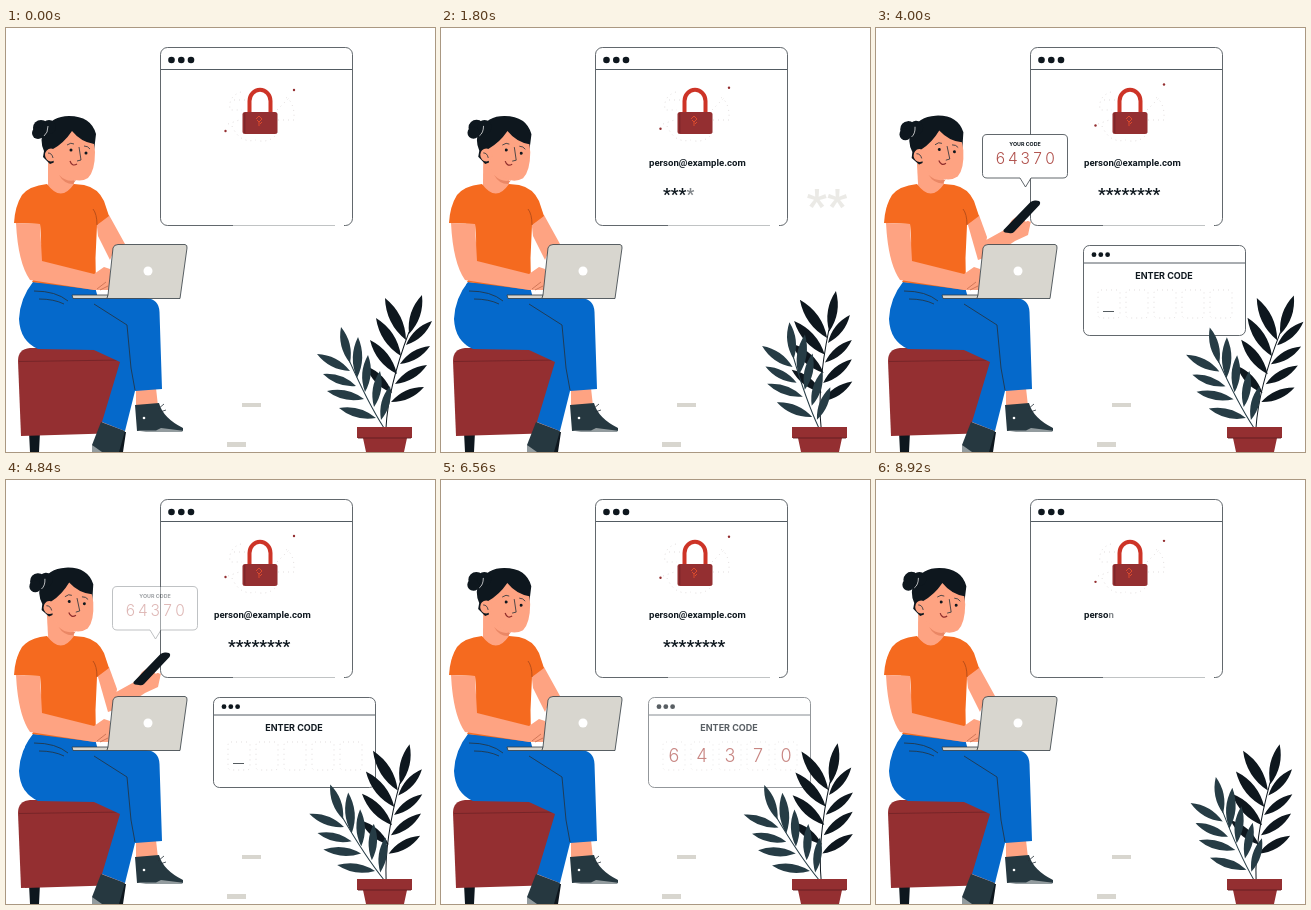
Animation, 429 px wide and 424 px high, one loop 8960 ms. Source, as an HTML page:

```html
<!DOCTYPE html>
<html lang="en">
<head>
<meta charset="utf-8">
<title>Two-step sign in</title>
<style>
  html, body { margin: 0; height: 100%; overflow: hidden; background: #fff; }
  svg { display: block; width: 100vw; height: 100vh; }
  text { fill: #101920; font-family: Inter, sans-serif; }
  .ink { fill: #0e171e; }
  .slate { fill: #263840; }
  .brick { fill: #942f31; }
  .skin { fill: #fea382; }
  .orange { fill: #f56a1f; }
  .blue { fill: #0569cb; }
  .grey { fill: #d8d6cf; }
  .line { fill: none; stroke: #26323a; stroke-width: .8; }
  .card { fill: #fff; stroke: #3a4248; stroke-width: .8; }
  .faint { fill: none; stroke: #d5cfcf; stroke-width: .7; stroke-dasharray: 1 4; }
  .bold { font-weight: 700; text-anchor: middle; }
  .digit { fill: #b0504b; font-weight: 300; text-anchor: middle; }
  .typed { font-family: Roboto, sans-serif; font-weight: 700; }
</style>
</head>
<body>
<svg viewBox="0 0 429 424" preserveAspectRatio="none">
  <!-- sign-in window -->
  <rect class="card" x="154.5" y="19.5" width="192" height="178" rx="7"/>
  <path d="M227 197.5H338" stroke="#fff" stroke-width="1.6"/>
  <path d="M227 197.5H329" stroke="#a5a9ab" stroke-width=".7"/>
  <path class="line" d="M155 41.5H346"/>
  <g class="ink"><circle cx="165.5" cy="32" r="3.3"/><circle cx="175.3" cy="32" r="3.3"/><circle cx="185" cy="32" r="3.3"/></g>

  <g class="faint">
    <path d="M235 64Q222 68 224 82H236M226 98Q234 116 250 112M272 92H288Q289 72 277 68M272 104Q266 114 254 113"/>
    <path d="M271 82L283 70M228 72H240M222 96L236 91"/>
  </g>
  <g id="sparks" class="brick"><circle cx="288" cy="0" r="1.2"/><circle cx="219.5" cy="41" r="1.2"/></g>
  <path id="shackle" d="M243.5 86V73a10.5 11.2 0 0 1 21 0V84" fill="none" stroke="#cd3427" stroke-width="4"/>
  <rect class="brick" x="236.5" y="84" width="35" height="22" rx="2.5"/>
  <path d="M238.8 85V105" stroke="#6f2226" stroke-width=".8"/>
  <path d="M250 91l3-3 3 3-3 3-2-2M253 94v4M256 94l-2 2" fill="none" stroke="#dc4b2d"/>
  <text id="mail" class="typed" x="208" y="137.5" font-size="9.6"></text>
  <text id="pass" class="typed" x="222" y="172" font-size="17.2"></text>
  <text id="stars" class="typed" x="365.5" y="193" font-size="45" style="fill:#d8d6cf">**</text>

  <!-- code window -->
  <g id="codeWin">
    <rect class="card" x="207.5" y="217.5" width="162" height="90" rx="6"/>
    <path class="line" d="M208 235H369"/>
    <g class="ink"><circle cx="218" cy="226.7" r="2.4"/><circle cx="224.8" cy="226.7" r="2.4"/><circle cx="231.6" cy="226.7" r="2.4"/></g>
    <text class="bold" x="288" y="251" font-size="9">ENTER CODE</text>
    <g id="cells"></g>
    <path id="caret" d="M227 283.5H238" stroke="#555c60"/>
  </g>

  <path class="grey" d="M236 375h19v4h-19zM221 414h19v5h-19z"/>

  <!-- seat -->
  <path class="ink" d="M23 404H34L33 424H24zM108 404H120L117 424H110z"/>
  <path class="brick" d="M12 333Q12 321 24 320H104Q116 321 116 334V405L15 408z"/>
  <path d="M13 333.5L116 332" fill="none" stroke="#6f2226" stroke-width=".8"/>

  <!-- legs -->
  <path class="skin" d="M130 361L150 360 152 378H130zM97 393L119 401 115 408 94 399z"/>
  <path class="slate" d="M129 377L153 375Q157 390 177 400V403H131z"/>
  <path d="M131 402.5H150L155 400 177 402.7 176 404H140z" fill="#939c9f"/>
  <path d="M152 381l6-5M154 384l6-2" class="line"/>
  <circle cx="138" cy="390" r="1.3" fill="#fff"/>
  <path class="slate" d="M95 394L119 403 113 424H86V417z"/>
  <path d="M86 417L96 424H86z" fill="#939c9f"/>
  <path class="blue" d="M27 254Q14 270 13 291 14 313 32 321L88 322 114 334 96 394 119 403 129 363 156 361 153.5 284Q153 271 140 270L92 270 89 259z"/>
  <path class="line" d="M28 263Q50 263 62 273M33 271Q48 271 58 276M88 276L121 297 125 340 129 362"/>

  <!-- far arm and phone -->
  <g id="restArm" class="skin"><path d="M90 190L103 187 119 216 109 220 104 232 92 208z"/></g>
  <g id="phoneArm">
    <path class="skin" d="M90 190L103 187 111 209 108 230 102 232z"/>
    <g id="forearm">
      <path class="skin" d="M103 216L130 201 136 192 143 187 152 196 155 193 152 207 139 213 109 233z"/>
      <path class="ink" d="M127.500 202L154.500 174Q157 172 160 172.500L163 173Q165 174 163.500 177L138 204Q136 206 133 205L129 204.500Q127 204 127.500 202z"/>
      <path class="skin" d="M140 203L151 193Q156 192 153 199L147 207 140 209z"/>
    </g>
  </g>

  <!-- torso and near arm -->
  <g id="head">
    <path class="skin" d="M42 130V160Q55 173 68 160V148z"/>
    <path d="M53 147Q61 155 70 152L67 156Q58 156 53 147z" fill="#ea8765"/>
    <path class="ink" d="M38 123Q33 112 38 102 46 88 63 88 85 88 90 106L88 123 78 118 52 133 44 136 37 129z"/>
    <circle class="ink" cx="35" cy="100" r="8"/><circle class="ink" cx="32" cy="105" r="6"/><circle class="ink" cx="43" cy="99" r="7"/>
    <path d="M38 108Q42 105 42 98" stroke="#fff" stroke-width=".7" fill="none"/>
    <path class="skin" d="M47 121Q58 115 66 103 75 114 88 116L89 124Q89 143 82 150 74 155 63 150L48 140z"/>
    <ellipse class="skin" cx="45" cy="127" rx="6" ry="6.500"/>
    <path d="M42 125Q46 125 47 130" class="line"/>
    <circle class="ink" cx="65" cy="122" r="1.500"/><circle class="ink" cx="80" cy="125" r="1.500"/>
    <path class="line" d="M61 117Q65 114 68 116M78 118Q82 118 84 121M73 119L75 132 71 133"/>
    <path d="M64 133Q66 139 71 136" fill="none" stroke="#8e2c2b" stroke-width="1.200"/>
  </g>
  <path class="orange" d="M41 156Q55 175 68 156L78 157Q92 160 98 173L103 188 91 197 89.500 230 90 262 26 254Q36 240 35 208L34 196 8 195Q9 178 16 167 23 158 41 156z"/>
  <path class="line" d="M87 181Q91 186 91 197" style="stroke:#a94718"/>
  <path class="skin" d="M10 195L34 196 36 233 88 246 98 239 104 241V262L88 262 24 252Q12 235 10 195z"/>
  <path class="line" d="M91 261L100 254M94 262L102 258" style="stroke:#c46c4f"/>

  <!-- laptop -->
  <path class="grey" stroke="#333c42" stroke-width=".8" d="M66 267H102L107 220Q108 216.500 112 216.500H179Q181.500 217 181 220L174 270.500H67z"/>
  <path class="line" d="M102 267L101 270"/>
  <circle cx="142" cy="243" r="4.500" fill="#fff"/>

  <!-- code message -->
  <g id="bubble">
    <path class="card" d="M111 106.500H187Q191.500 106.500 191.500 111V145.500Q191.500 150 187 150H155L149.500 159 144 150H111Q106.500 150 106.500 145.500V111Q106.500 106.500 111 106.500z"/>
    <text class="bold" x="149" y="118" font-size="5.300">YOUR CODE</text>
  </g>

  <!-- plant -->
  <g id="rightBranch"></g>
  <g id="leftBranch"></g>
  <path class="brick" d="M351 399H406V410H401L398 424H360L357 410H351z"/>
  <path d="M352 410H405" stroke="#5e1c20" stroke-width=".9"/>
</svg>
<script>
const LOOP = 8960, CYCLE = 8000, CODE = '64370';
const $ = id => document.getElementById(id);
const NS = 'http://www.w3.org/2000/svg';

function add(parent, tag, attrs, text = '') {
  const el = document.createElementNS(NS, tag);
  for (const k in attrs) el.setAttribute(k, attrs[k]);
  el.textContent = text;
  parent.append(el);
  return el;
}
const clamp = v => Math.max(0, Math.min(1, v));
const ramp = (t, a, b) => { const u = clamp((t - a) / (b - a)); return u * u * (3 - 2 * u); };
const span = (t, a, b, c, d) => ramp(t, a, b) * (1 - ramp(t, c, d));
const fade = (el, v) => el.setAttribute('opacity', v);
const turn = (id, a, x, y) => $(id).setAttribute('transform', `rotate(${a} ${x} ${y})`);

// Smooth curve through [time, value] keys
function spline(t, keys) {
  let i = 0;
  while (i < keys.length - 2 && t > keys[i + 1][0]) i++;
  const slope = j => {
    const p = keys[Math.max(0, j - 1)], q = keys[Math.min(keys.length - 1, j + 1)];
    return (q[1] - p[1]) / (q[0] - p[0]);
  };
  const [t0, a] = keys[i], [t1, b] = keys[i + 1], h = t1 - t0, u = (t - t0) / h, v = 1 - u;
  return v * v * (1 + 2 * u) * a + u * u * (3 - 2 * u) * b + h * u * v * (v * slope(i) - u * slope(i + 1));
}

function letters(id, str) {
  return [...str].map(c => add($(id), 'tspan', {}, c));
}
const mail = letters('mail', 'person@example.com');
const pass = letters('pass', '********');

const digits = [...CODE].map((c, i) => {
  const x = 233 + 28 * i;
  add($('cells'), 'rect', { class: 'faint', x: x - 11, y: 262, width: 22, height: 28, rx: 3 });
  add($('bubble'), 'text', { class: 'digit', x: 124.5 + 12.4 * i, y: 136, 'font-size': 15.5 }, c);
  return add($('cells'), 'text', { class: 'digit', x, y: 282, 'font-size': 18 }, c);
});

// Each leaf: root x, y and tip x, y
function branch(id, color, stem, leaves) {
  add($(id), 'path', { d: stem, fill: 'none', stroke: color, 'stroke-width': 1 });
  const d = leaves.map(([x, y, X, Y]) => {
    const mx = x + (X - x) * .5, my = y + (Y - y) * .5, nx = (Y - y) * .23, ny = (x - X) * .23;
    return `M${x} ${y}Q${mx + nx} ${my + ny} ${X} ${Y}Q${mx - nx} ${my - ny} ${x} ${y}`;
  }).join('');
  add($(id), 'path', { d, fill: color });
}
branch('rightBranch', '#0e171e', 'M380 400Q382 360 403 304', [
  [403, 306, 416, 267], [400, 312, 379, 270], [400, 317, 426, 293],
  [395, 328, 370, 290], [394, 336, 424, 318], [391, 346, 364, 312],
  [389, 356, 421, 337], [386, 365, 360, 338], [385, 374, 418, 359]]);
branch('leftBranch', '#263c45', 'M378 400Q362 375 343 332', [
  [344, 335, 335, 299], [344, 343, 311, 326], [351, 350, 352, 309],
  [350, 358, 317, 346], [359, 364, 362, 327], [358, 371, 321, 363],
  [368, 379, 374, 343], [370, 390, 333, 380], [375, 392, 384, 358]]);

const leftSway = [[0, 0], [860, 2.5], [2680, 10], [4000, -.7], [5800, -10], [7360, -1.7], [8000, 0]];
const rightSway = [[0, 0], [860, -5], [1850, -9], [2680, -5], [4000, .8], [5800, -12], [7360, -1.8], [8000, 0]];
const headTilt = [[0, 0], [2250, 0], [2680, -5], [3200, -3.5], [4000, -3], [4900, -3], [5450, 0], [8000, 0]];
const bob = [[0, 62], [800, 61], [2680, 58.5], [4000, 56.5], [5800, 56], [7360, 58.5], [8000, 62]];

function draw(now) {
  const t = now % LOOP % CYCLE;
  const shown = 1 - ramp(t, 7600, 7900);
  mail.forEach((el, i) => el.setAttribute('fill-opacity', clamp((t - 700 - 40 * i) / 40) * shown));
  pass.forEach((el, i) => el.setAttribute('fill-opacity', clamp((t - 1600 - 60 * i) / 40) * shown));
  fade($('stars'), span(t, 1700, 1900, 3100, 3400));

  $('sparks').setAttribute('transform', `translate(0 ${spline(t, bob)})`);
  turn('shackle', -20 * span(t, 6800, 7050, 7700, 7950), 243.5, 84);

  fade($('codeWin'), span(t, 2150, 2450, 6450, 6750));
  fade($('caret'), +(t < 5000));
  digits.forEach((el, i) => fade(el, clamp((t - 5000 - 130 * i) / 80)));

  const raised = t > 2250 && t < 5450;
  fade($('phoneArm'), +raised);
  fade($('restArm'), +!raised);
  turn('forearm', 70 - 61 * ramp(t, 2250, 2650) - 9 * ramp(t, 2680, 3000) + 70 * ramp(t, 4950, 5450), 107, 226);
  turn('head', spline(t, headTilt), 55, 155);
  fade($('bubble'), span(t, 3050, 3300, 4700, 4950));

  turn('leftBranch', spline(t, leftSway), 378, 399);
  turn('rightBranch', spline(t, rightSway), 380, 399);
}

const start = performance.now();
function tick() {
  draw(performance.now() - start);
  requestAnimationFrame(tick);
}
tick();
</script>
</body>
</html>
```
